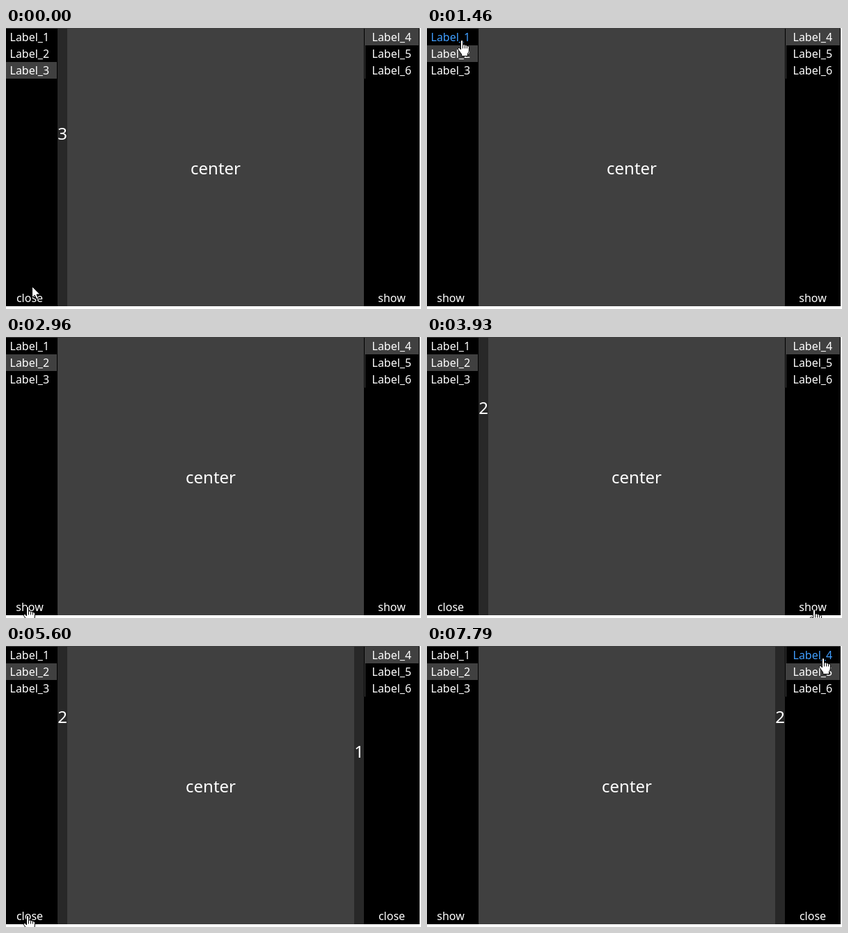
Write an HTML page with a canvas that moves like this. It is 596x405 px and loops after 8000 ms.

```html
<!DOCTYPE html>
<html lang="en">
<head>
<meta charset="utf-8">
<title>Side panels</title>
<style>
  html, body { margin: 0; width: 100%; height: 100%; overflow: hidden; background: #fff; }
  canvas { display: block; }
</style>
</head>
<body>
<canvas id="stage"></canvas>
<script>
const W = 596, H = 405, LOOP = 8000;
const BLACK = '#000', WHITE = '#fff', GRAY = '#404040', PANEL = '#282828', BLUE = '#409eff';
const FONT = '"Noto Sans", "Open Sans", sans-serif';
const RIGHT_EDGE = 594, BOTTOM = 401, ROW = 24, PANEL_W = 14, LIST_END = 1 + 3 * ROW;

const canvas = document.getElementById('stage');
const ctx = canvas.getContext('2d');
const dpr = window.devicePixelRatio || 1;
canvas.width = W * dpr;
canvas.height = H * dpr;
canvas.style.width = W + 'px';
canvas.style.height = H + 'px';

// tip: where the pointer touches the button; labelTip: x for each label number.
const left = {
  rowX: 0, rowW: 73, textX: 5.5, buttonX: 34, panelX: 74, firstLabel: 1,
  numberY: n => 11 + 50 * n, tip: { x: 31, y: 388 }, labelTip: n => 52 - 2 * n
};
const right = {
  rowX: 516, rowW: 77, textX: 525.5, buttonX: 554, panelX: 500, firstLabel: 4,
  numberY: n => 211 - 50 * n, tip: { x: 556, y: 392 }, labelTip: n => 587 - 18 * n
};

// The pointer visits labels and buttons in turn, and clicks as it leaves.
const START = 40, REST = 290, NEAR_TIME = 220, FAR_TIME = 680, REDRAW = 140;
const home = { x: 37, y: 372 };
const button = side => ({ side, ...side.tip });
const label = (side, n) => ({ side, n, x: side.labelTip(n), y: n * ROW - 7 });
const brief = visit => ({ ...visit, rest: 0 });
const glance = visit => ({ ...visit, rest: 0, noClick: true });

const visits = [
  button(left), brief(label(left, 2)), label(left, 1), label(left, 2), button(left),
  button(right), glance(label(left, 3)), button(left),
  label(right, 2), brief(label(right, 3)), label(right, 2), label(right, 1)
];

let clock = START, previous = home;
for (const visit of visits) {
  const distance = Math.hypot(visit.x - previous.x, visit.y - previous.y);
  visit.from = previous;
  visit.start = clock;
  visit.travel = distance < 100 ? NEAR_TIME : FAR_TIME;
  visit.leave = clock = visit.start + visit.travel + (visit.rest ?? REST);
  previous = visit;
}

function setState(t) {
  Object.assign(left, { selected: 3, open: true });
  Object.assign(right, { selected: 1, open: false });
  for (const { side, n, leave, noClick } of visits) {
    if (leave > t || noClick) continue;
    if (n) side.selected = n;
    else side.open = !side.open;
  }
}

// Pointer motion is eased, but seen only at each redraw.
function pointerAt(t) {
  const visit = visits.find(v => t < v.leave) ?? visits[visits.length - 1];
  const steps = Math.ceil(visit.travel / REDRAW);
  const progress = Math.min(1, Math.max(0, (t - visit.start) / visit.travel));
  const p = Math.floor(progress * steps) / steps;
  const eased = p * p * (3 - 2 * p);
  const mix = axis => Math.round(visit.from[axis] + (visit[axis] - visit.from[axis]) * eased);
  return { x: mix('x'), y: mix('y') };
}

function rect(color, x, y, w, h) {
  ctx.fillStyle = color;
  ctx.fillRect(x, y, w, h);
}

function text(string, x, y, size, align = 'center', color = WHITE) {
  ctx.font = `500 ${size}px ${FONT}`;
  ctx.textAlign = align;
  ctx.fillStyle = color;
  ctx.fillText(string, x, y);
}

const isOver = (side, { x }) => x >= side.rowX && x < side.rowX + side.rowW;

function drawSide(side, pointer) {
  for (let n = 1; n <= 3; n++) {
    const y = 1 + (n - 1) * ROW;
    const hovered = isOver(side, pointer) && pointer.y >= y && pointer.y < y + ROW;
    if (side.selected === n) rect(GRAY, side.rowX, y, side.rowW, ROW);
    text('Label_' + (side.firstLabel + n - 1), side.textX, y + 18, 16, 'left', hovered ? BLUE : WHITE);
  }
  text(side.open ? 'close' : 'show', side.buttonX, 395, 16);
  if (side.open) {
    rect(PANEL, side.panelX, 1, PANEL_W, BOTTOM - 1);
    text(side.selected, side.panelX + PANEL_W / 2, side.numberY(side.selected), 24);
  }
}

const arrow = new Path2D('M.5 .5V16.5L4.2 13L7 19L9.6 17.9L7 12H11.8Z');
const hand = new Path2D(
  'M4.5 14V2Q4.5 .5 6 .5T7.5 2V8Q7.5 6.7 9 6.7T10.5 8.3Q10.7 7.4 12 7.5T13.4 9.2' +
  'Q13.6 8.5 14.8 8.7T16.4 10.5V15Q16.4 17.5 14.5 20V23.5H5.7V21L1 14.5' +
  'Q-.2 12.5 1 11.7T3.2 12.3Z');
const fingers = new Path2D('M7.5 8V12.5M10.5 8.3V12.5M13.4 9.2V12.5');

function drawPointer({ x, y }, isHand) {
  const shape = isHand ? hand : arrow;
  ctx.save();
  ctx.translate(isHand ? x - 6 : x, y);
  ctx.fillStyle = WHITE;
  ctx.strokeStyle = BLACK;
  ctx.lineWidth = 1;
  ctx.fill(shape);
  ctx.stroke(shape);
  if (isHand) ctx.stroke(fingers);
  ctx.restore();
}

function draw(t) {
  setState(t);
  const pointer = pointerAt(t);
  ctx.setTransform(dpr, 0, 0, dpr, 0, 0);
  rect(WHITE, 0, 0, W, H);
  rect(BLACK, 0, 0, RIGHT_EDGE, BOTTOM);
  rect(GRAY, 0, 0, RIGHT_EDGE, 1);
  rect(GRAY, 74, 0, 440, BOTTOM);
  rect(GRAY, 515, 1, 1, 3 * ROW);
  drawSide(left, pointer);
  drawSide(right, pointer);
  text('center', 294 + PANEL_W / 2 * (left.open - right.open), 211, 24);
  const onControl = pointer.y < LIST_END || pointer.y >= BOTTOM - ROW;
  drawPointer(pointer, onControl && (isOver(left, pointer) || isOver(right, pointer)));
}

const begin = performance.now();
function frame() {
  draw((performance.now() - begin) % LOOP);
  requestAnimationFrame(frame);
}
frame();
</script>
</body>
</html>
```
